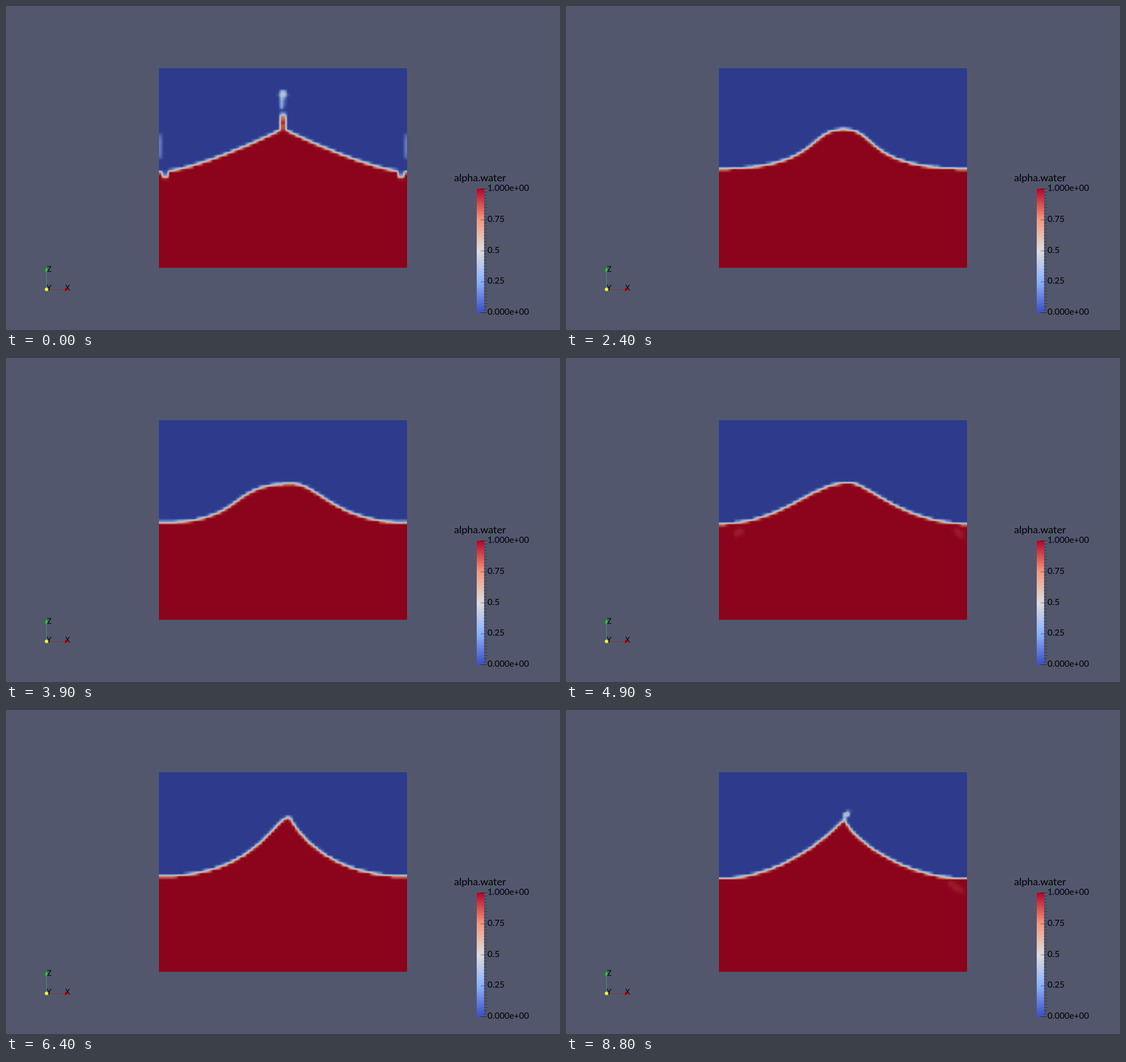
An HTML page with a canvas that plays this animation: 978x573 px, repeating every 8900 ms.

```html
<!DOCTYPE html>
<html lang="en">
<head>
<meta charset="utf-8">
<title>alpha.water</title>
<style>
  html, body { margin: 0; width: 100%; height: 100%; overflow: hidden; background: #52576e; }
  #tank { position: absolute; left: 270px; top: 110px; }
  #bar { position: absolute; left: 831px; top: 323px; width: 13px; height: 220px; }
  svg { position: absolute; left: 0; top: 0; }
  text { font-family: Lato, "Open Sans", sans-serif; font-size: 15.2px; fill: #000; }
  .title { font-size: 18px; }
  .axis { font-size: 13px; }
</style>
</head>
<body>
<canvas id="tank" width="438" height="353"></canvas>
<div id="bar"></div>
<svg width="978" height="573" viewBox="0 0 978 573">
  <text class="title" x="791" y="310">alpha.water</text>
  <g id="scale"></g>
  <path d="M71.5 501V469" stroke="#55906a"/>
  <path d="M72 501.5H104" stroke="#7b3a48"/>
  <path d="M71.5 462L75 469.5H68Z" fill="#00e000"/>
  <path d="M110 501.5L103.5 498V505Z" fill="#d80000"/>
  <circle cx="71.5" cy="501.3" r="3" fill="#ffff20"/>
  <text class="axis" x="72.5" y="470">Z</text>
  <text class="axis" x="72" y="503">Y</text>
  <text class="axis" x="104.5" y="502.5">X</text>
</svg>
<script>
const LOOP = 8900, STEP = 100, PERIOD = 8800 / 7;
const BOX = { x: 270, y: 110, w: 438, h: 353 };
const LEFT = BOX.x, RIGHT = BOX.x + BOX.w, MID = (LEFT + RIGHT) / 2;
const COLS = 80, ROWS = 64, HALF = 120;

const coolWarm = [[59, 76, 192], [141, 176, 254], [221, 221, 221], [244, 154, 123], [180, 4, 38]];
const shaded = [[46, 59, 140], [115, 150, 213], [195, 197, 200], [203, 118, 90], [140, 4, 28]];

const lerp = (a, b, p) => a + (b - a) * p;

// Legend
document.getElementById('bar').style.background =
  `linear-gradient(to top, ${coolWarm.map(c => `rgb(${c})`).join(', ')})`;
let marks = '';
for (let i = 0; i <= 40; i++) {
  const y = 323.5 + i * 5.475;
  const major = i % 10 === 0;
  marks += `<path d="M${major ? 838 : 843.5} ${y}H849" stroke="#000" stroke-opacity="${major ? 0.6 : 0.45}" stroke-width=".8"/>`;
  if (major) {
    const value = 1 - i / 40;
    marks += `<text x="850" y="${y + 3.6}">${value % 1 ? value : value.toFixed(3) + 'e+00'}</text>`;
  }
}
document.getElementById('scale').innerHTML = marks;

// Colour for every water fraction from 0 to 255
const palette = Array.from({ length: 256 }, (_, i) => {
  const v = i / 255 * 4, k = Math.min(3, Math.floor(v));
  return shaded[k].map((c, n) => lerp(c, shaded[k + 1][n], v - k));
});

const poses = [];

// One side of a crest: level for `hold` pixels at the wall, rounded by `round` at the tip
function flank(wall, tipX, tipY, trough, hold, round) {
  const side = Math.sign(tipX - wall);
  const bezier = (t, a, b, c, d) =>
    (1 - t) ** 3 * a + 3 * t * (1 - t) ** 2 * b + 3 * t * t * (1 - t) * c + t ** 3 * d;
  return Array.from({ length: HALF + 1 }, (_, i) => {
    const t = i / HALF;
    return [
      bezier(t, wall, wall + side * hold, tipX - side * round, tipX),
      bezier(t, trough, trough, tipY, tipY)
    ];
  });
}

function crest(time, x, y, trough, [holdL, roundL], [holdR, roundR]) {
  const left = flank(LEFT, x, y, trough, holdL, roundL);
  const right = flank(RIGHT, x, y, trough, holdR, roundR);
  poses.push({ time, line: [...left, ...right.reverse().slice(1)] });
}

// Water piled up at both walls, with a thin jet above the shoulder
function wallSwell(time, tip) {
  const trough = 300, shoulder = Math.max(tip, 207);
  const line = Array.from({ length: 2 * HALF + 1 }, (_, i) => {
    const x = lerp(LEFT, RIGHT, i / (2 * HALF));
    const u = 1 - Math.abs(x - MID) / (MID - LEFT);
    const wave = ((1 + Math.cos(Math.PI * u)) / 2) ** 1.2;
    return [x, trough - (trough - shoulder) * wave - (shoulder - tip) * Math.exp(-u * 25)];
  });
  poses.push({ time, line });
}

crest(0, 489, 216, 293, [65, -3], [65, -3]);
crest(PERIOD, 489, 207, 296, [140, 50], [140, 50]);
crest(2400, 490, 218, 287.5, [180, 65], [185, 62]);
crest(3900, 505, 222, 291, [159, 120], [128, 47]);
crest(4900, 500, 220, 293, [114, 69], [111, 31]);
crest(6400, 501, 189, 294, [174, 29], [160, -1]);
crest(7500, 485, 208, 297, [118, 37], [133, 60]);
crest(8800, 502, 180, 298, [138, -1], [145, -47]);
[192, 204, 165, 194, 185, 169, 190].forEach((tip, k) => wallSwell((k + 0.5) * PERIOD, tip));
poses.sort((a, b) => a.time - b.time);

// Spray and jets above the surface, air trapped below it
const wisps = [
  { time: 0, x: MID, y: 155, rx: 6, ry: 7, alpha: 0.5, fall: 60 },
  { time: 0, x: MID - 2, y: 170, rx: 4, ry: 13, alpha: 0.35, fall: 60 },
  { time: 0, x: MID, y: 207, rx: 5, ry: 18, alpha: 1, fall: 40 },
  { time: 0, x: LEFT, y: 248, rx: 4, ry: 23, alpha: 0.25, fall: 40, twin: true },
  { time: 0, x: LEFT + 11, y: 295, rx: 5, ry: 9, alpha: 1, air: true, twin: true },
  { time: 4900, x: LEFT + 35, y: 308, rx: 9, ry: 6, turn: -0.5, alpha: 0.06, air: true },
  { time: 4900, x: RIGHT - 15, y: 309, rx: 11, ry: 6, turn: 0.8, alpha: 0.05, air: true },
  { time: 8800, x: RIGHT - 20, y: 313, rx: 17, ry: 6, turn: 0.6, alpha: 0.05, air: true }
];

function surfaceAt(t) {
  const k = Math.max(0, poses.findIndex(p => p.time >= t) - 1);
  const a = poses[k], b = poses[k + 1];
  const mix = (1 - Math.cos(Math.PI * (t - a.time) / (b.time - a.time))) / 2;
  return a.line.map(([x, y], i) => [lerp(x, b.line[i][0], mix), lerp(y, b.line[i][1], mix)]);
}

const view = document.getElementById('tank').getContext('2d', { willReadFrequently: true });
const grid = Object.assign(document.createElement('canvas'), { width: COLS, height: ROWS });
const cells = grid.getContext('2d');
const sx = COLS / BOX.w, sy = ROWS / BOX.h;

function drawWisps(t) {
  for (const w of wisps) {
    const age = Math.abs(t - w.time) / 400;
    if (age >= 1) continue;
    cells.globalCompositeOperation = w.air ? 'destination-out' : 'source-over';
    cells.globalAlpha = w.alpha * (1 - age);
    for (const x of w.twin ? [w.x, LEFT + RIGHT - w.x] : [w.x]) {
      cells.beginPath();
      cells.ellipse(x, w.y + (w.fall || 0) * age * age, w.rx, w.ry, w.turn || 0, 0, Math.PI * 2);
      cells.fill();
    }
  }
  cells.globalAlpha = 1;
  cells.globalCompositeOperation = 'source-over';
}

function draw(t) {
  // Water fraction per cell, kept in the alpha channel
  cells.setTransform(1, 0, 0, 1, 0, 0);
  cells.clearRect(0, 0, COLS, ROWS);
  cells.setTransform(sx, 0, 0, sy, -BOX.x * sx, -BOX.y * sy);
  cells.filter = 'blur(0.7px)';
  const line = surfaceAt(t);
  cells.beginPath();
  cells.moveTo(LEFT - 70, 520);
  cells.lineTo(LEFT - 70, line[0][1]);
  line.forEach(([x, y]) => cells.lineTo(x, y));
  cells.lineTo(RIGHT + 70, line[2 * HALF][1]);
  cells.lineTo(RIGHT + 70, 520);
  cells.fill();
  drawWisps(t);

  view.clearRect(0, 0, BOX.w, BOX.h);
  view.drawImage(grid, 0, 0, BOX.w, BOX.h);
  const image = view.getImageData(0, 0, BOX.w, BOX.h), px = image.data;
  for (let i = 0; i < px.length; i += 4) {
    px.set(palette[px[i + 3]], i);
    px[i + 3] = 255;
  }
  view.putImageData(image, 0, 0);
}

const start = performance.now();
let shown = -1;
function tick() {
  const t = Math.floor((performance.now() - start) % LOOP / STEP) * STEP;
  if (t !== shown) draw(shown = t);
  requestAnimationFrame(tick);
}
tick();
</script>
</body>
</html>
```
